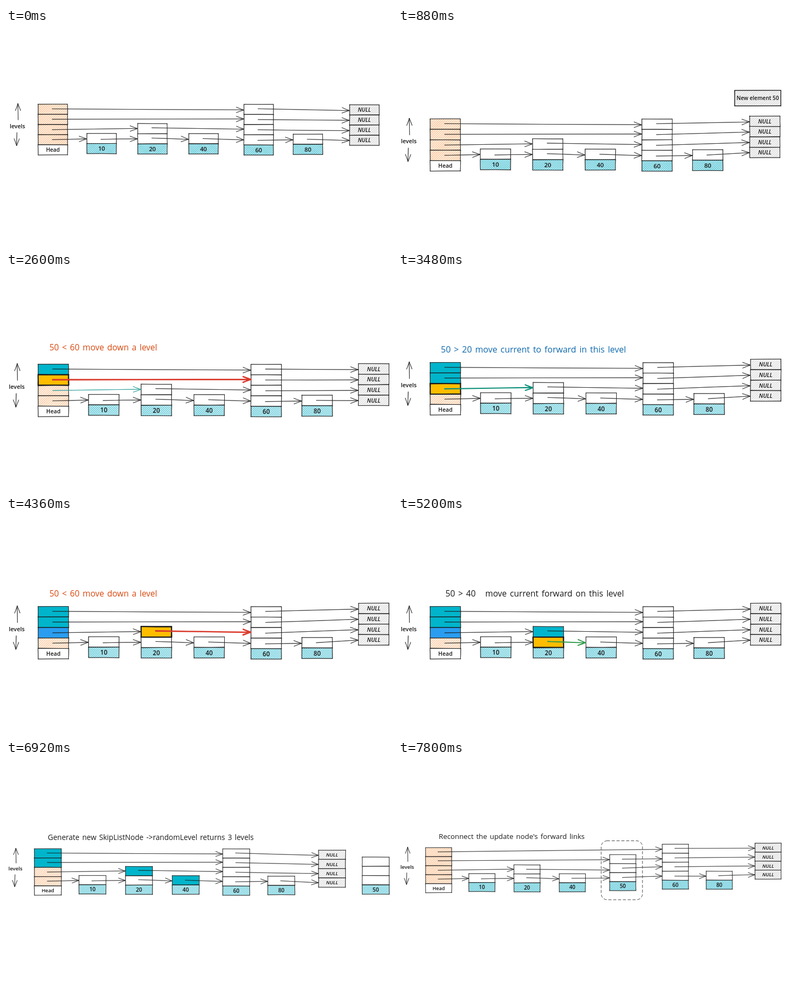
An HTML page for the animation above (8.68 s loop, 720 by 405 pixels).

```html
<!DOCTYPE html>
<html lang="en">
<head>
<meta charset="utf-8">
<title>Skip list insertion</title>
<style>
  html, body { margin: 0; width: 100%; height: 100%; overflow: hidden; background: #fff; }
  svg { display: block; width: 100vw; height: 100vh; }
  text { font-family: "Open Sans", "Noto Sans", sans-serif; fill: #151515; white-space: pre; }
  .label { font-weight: 600; text-anchor: middle; }
  .caption { word-spacing: .12em; }
  .ink { fill: none; stroke-linecap: round; stroke-linejoin: round; }
  .scene { visibility: hidden; }
  .scene.on { visibility: visible; }
</style>
</head>
<body>
<svg viewBox="0 0 720 405">
  <defs>
    <pattern id="orange" width="2.9" height="2.9" patternUnits="userSpaceOnUse" patternTransform="rotate(45)">
      <path d="M0 0H2.9V2.9H0Z" fill="#fff6ec"/>
      <path d="M1.45 0V2.9" stroke="#fbb683" stroke-width="1.05"/>
    </pattern>
    <pattern id="grey" width="3" height="3" patternUnits="userSpaceOnUse" patternTransform="rotate(45)">
      <path d="M0 0H3V3H0Z" fill="#f5f5f5"/>
      <path d="M1.5 0V3" stroke="#cbcbcb" stroke-width=".75"/>
    </pattern>
    <pattern id="aqua" width="2.8" height="2.8" patternUnits="userSpaceOnUse" patternTransform="rotate(45)">
      <path d="M0 0H2.8V2.8H0Z" fill="#d4f2f6"/>
      <path d="M1.4 0V2.8M0 1.4H2.8" stroke="#4fc2d2" stroke-width=".8"/>
    </pattern>
  </defs>
</svg>
<script>
const svg = document.querySelector('svg');
const W = 56.8, ROW = 19.65, LOOP = 8680;
const INK = '#1a1a1a', CYAN = '#00b5cb', BLUE = '#2a9df0', YELLOW = '#ffbd00';
const RED = '#d93a2c', TEAL = '#0b8f78', GREEN = '#2c9a48', RUST = '#d6480f', NAVY = '#0f69ad';

// [x, y, rows] relative to the head's top left corner
const NODES = {
  head: [0, 0, 5], n10: [94, 56.5, 2], n20: [192, 37.5, 3], n40: [290.5, 57, 2],
  n60: [397, .2, 5], n80: [492, 58, 2], nil: [597.5, -6.3, 4]
};

// [from, row, to, row, start nudge, end nudge]
const LINKS = [
  ['head', 0, 'n60', 0, -.8, 1], ['head', 1, 'n60', 1, -.4, -1.2],
  ['head', 2, 'n20', 0, 0, -.3], ['head', 3, 'n10', 0, 0, .7],
  ['n10', 0, 'n20', 1, 1.5, 0], ['n20', 0, 'n60', 2, -1.6, -1.2],
  ['n20', 1, 'n40', 0, -1.8, 1], ['n40', 0, 'n60', 3, -.3, 0],
  ['n60', 0, 'nil', 0, -1, 1.2], ['n60', 1, 'nil', 1, 0, .8],
  ['n60', 2, 'nil', 2, .4, .8], ['n60', 3, 'n80', 0, 1, 1], ['n80', 0, 'nil', 3, 0, .3]
];
const REWIRED = [
  ...LINKS.filter(([from, row]) => !['head1', 'n200', 'n400'].includes(from + row)),
  ['head', 1, 'n50', 0, -.8, 1], ['n20', 0, 'n50', 1, -.3, 4], ['n40', 0, 'n50', 2, 0, 1.6],
  ['n50', 0, 'n60', 1, 0, 2.5], ['n50', 1, 'n60', 2, 0, 0], ['n50', 2, 'n60', 3, .5, .8]
];

const top2 = { head0: CYAN, head1: CYAN };
const visited = { ...top2, head2: BLUE, n200: CYAN };
const moveDown = '50 < 60 move down a level';

const SCENES = [
  { at: 0, x: 60, y: 143, s: .967, place: { nil: [600.8, 1, 4] } },
  { at: 880, y: 170.5, s: .995, place: { nil: [599, -5.5, 4] }, extra: newElement },
  { at: 1760, light: 1, hot: 'head0', arrows: { head0: [RED, 2.4] },
    caption: [moveDown, 81, 148, 15.5, RUST] },
  { at: 2600, light: 1, y: 173, place: { nil: [597.5, -1, 4] }, fills: { head0: CYAN }, hot: 'head1',
    arrows: { head1: [RED, 2.4], head2: ['#2a9d98', .8] },
    caption: [moveDown, 81, 147, 15.5, RUST] },
  { at: 3480, light: 1, fills: top2, hot: 'head2', arrows: { head2: [TEAL, 1.9] },
    caption: ['50 > 20 move current to forward in this level', 80, 151, 16, NAVY] },
  { at: 4360, light: 1, fills: { ...top2, head2: BLUE }, hot: 'n200', arrows: { n200: [RED, 2.4] },
    caption: [moveDown, 81, 151, 15.5, RUST] },
  { at: 5200, light: 1, fills: visited, hot: 'n201', arrows: { n201: [GREEN, 1.7] },
    caption: ['50 > 40   move current forward on this level', 88.5, 151, 15.6, INK] },
  { at: 6080, light: 1, fills: { ...visited, n201: BLUE }, hot: 'n400', arrows: { n400: [RED, 2.4] },
    caption: ['50 < 60   we are on the lowest level so insert after current', 89, 151, 15.6, INK] },
  { at: 6920, light: 1, x: 53, y: 166.5, s: .885,
    place: { nil: [598.9, 2.8, 4], n50: [691, 17.5, 4] },
    fills: { ...top2, n200: CYAN, n400: CYAN },
    caption: ['Generate new SkipListNode ->randomLevel returns 3 levels', 78, 149.5, 13.65, INK] },
  { at: 7800, x: 51.5, y: 164.5, s: .858, links: REWIRED,
    place: { n50: [400.3, 15.2, 4], n60: [514.6, -7.6, 5], n80: [610.1, 51.3, 2], nil: [716.2, -9.9, 4] },
    caption: ['Reconnect the update node\'s forward links', 76, 148, 13.3, INK], extra: dashedFrame }
];

function add(parent, tag, attrs, text) {
  const el = document.createElementNS(svg.namespaceURI, tag);
  for (const k in attrs) el.setAttribute(k, attrs[k]);
  if (text) el.textContent = text;
  return parent.appendChild(el);
}

// Two slightly bowed strokes, with wobble that depends only on the end points
function sketch(x1, y1, x2, y2, amount = .4) {
  let seed = Math.abs(Math.round(x1 * 131 + y1 * 717 + x2 * 37 + y2 * 91)) + 1;
  const wob = () => {
    seed = (seed * 16807 + 11) % 2147483647;
    return ((seed / 2147483647) * 2 - 1) * amount;
  };
  const stroke = () => `M${x1 + wob()} ${y1 + wob()}Q${(x1 + x2) / 2 + wob()} ${(y1 + y2) / 2 + wob() * 1.5} ${x2 + wob()} ${y2 + wob()}`;
  return stroke() + stroke();
}

function outline(g, x, y, w, h, width = .72) {
  const d = sketch(x, y, x + w, y) + sketch(x + w, y, x + w, y + h) +
    sketch(x + w, y + h, x, y + h) + sketch(x, y + h, x, y);
  add(g, 'path', { d, class: 'ink', stroke: INK, 'stroke-width': width });
}

function arrow(g, x1, y1, x2, y2, color = INK, width = .68, size = 15) {
  const a = Math.atan2(y2 - y1, x2 - x1);
  let d = sketch(x1, y1, x2, y2);
  for (const side of [-.36, .36]) {
    d += sketch(x2 - size * Math.cos(a + side), y2 - size * Math.sin(a + side), x2, y2, .3);
  }
  add(g, 'path', { d, class: 'ink', stroke: color, 'stroke-width': width });
}

function label(g, text, x, y, size, attrs) {
  add(g, 'text', { x, y: y + size * .38, 'font-size': size, class: 'label', ...attrs }, text);
}

function drawNode(g, name, [x, y, rows], scene) {
  for (let r = 0; r < rows; r++) {
    const last = r === rows - 1, key = name + r, cy = y + r * ROW;
    let fill = '#fff';
    if (name === 'nil') fill = 'url(#grey)';
    else if (name === 'head' && !last) fill = 'url(#orange)';
    else if (name !== 'head' && last) fill = 'url(#aqua)';
    const solid = key === scene.hot ? YELLOW : scene.fills?.[key];
    add(g, 'rect', { x, y: cy, width: W, height: ROW, fill: solid || fill,
      opacity: scene.light && !solid ? .88 : 1 });
    outline(g, x, cy, W, ROW);
    const mid = [x + W / 2, cy + ROW / 2];
    if (name === 'nil') label(g, 'NULL', ...mid, 10.5, { 'font-style': 'italic' });
    else if (last && name === 'head') label(g, 'Head', ...mid, 10.5);
    else if (last) label(g, name.slice(1), ...mid, 11.6);
  }
}

function drawLevels(g) {
  arrow(g, -38.5, 30, -39, -1, INK, .68, 14);
  label(g, 'levels', -40, 42, 10.9);
  arrow(g, -41, 55, -41.5, 80, INK, .68, 14);
}

function newElement(g) {
  add(g, 'rect', { x: 628, y: 117, width: 86, height: 29, fill: 'url(#grey)' });
  outline(g, 628, 117, 86, 29, .9);
  label(g, 'New element 50', 671, 131.5, 10.1);
}

function dashedFrame(g) {
  add(g, 'rect', { x: 379, y: 151.5, width: 77, height: 110.5, rx: 11, class: 'ink',
    stroke: '#444', 'stroke-width': 1, 'stroke-dasharray': '5 4' });
}

function drawScene(scene) {
  const { x = 60, y = 169.8, s = 1, links = LINKS, arrows = {}, hot, caption } = scene;
  const root = add(svg, 'g', { class: 'scene' });
  const g = add(root, 'g', { transform: `translate(${x} ${y}) scale(${s})` });
  const nodes = { ...NODES, ...scene.place };
  drawLevels(g);
  for (const name in nodes) drawNode(g, name, nodes[name], scene);
  if (hot) {
    const [hx, hy] = nodes[hot.slice(0, -1)];
    outline(g, hx, hy + hot.slice(-1) * ROW, W, ROW, 2);
  }
  for (const [from, r1, to, r2, d1, d2] of links) {
    const [ax, ay] = nodes[from], [bx, by] = nodes[to];
    arrow(g, ax + 27, ay + (r1 + .5) * ROW + d1, bx - .7, by + (r2 + .5) * ROW + d2,
      ...(arrows[from + r1] || []));
  }
  scene.extra?.(root);
  if (caption) {
    const [text, cx, cy, size, fill] = caption;
    add(root, 'text', { x: cx, y: cy, 'font-size': size, class: 'caption', style: `fill:${fill}` }, text);
  }
  return root;
}

const groups = SCENES.map(drawScene);

function tick() {
  const t = performance.now() % LOOP;
  const current = SCENES.findLastIndex(scene => scene.at <= t);
  groups.forEach((g, i) => g.classList.toggle('on', i === current));
  requestAnimationFrame(tick);
}
tick();
</script>
</body>
</html>
```
